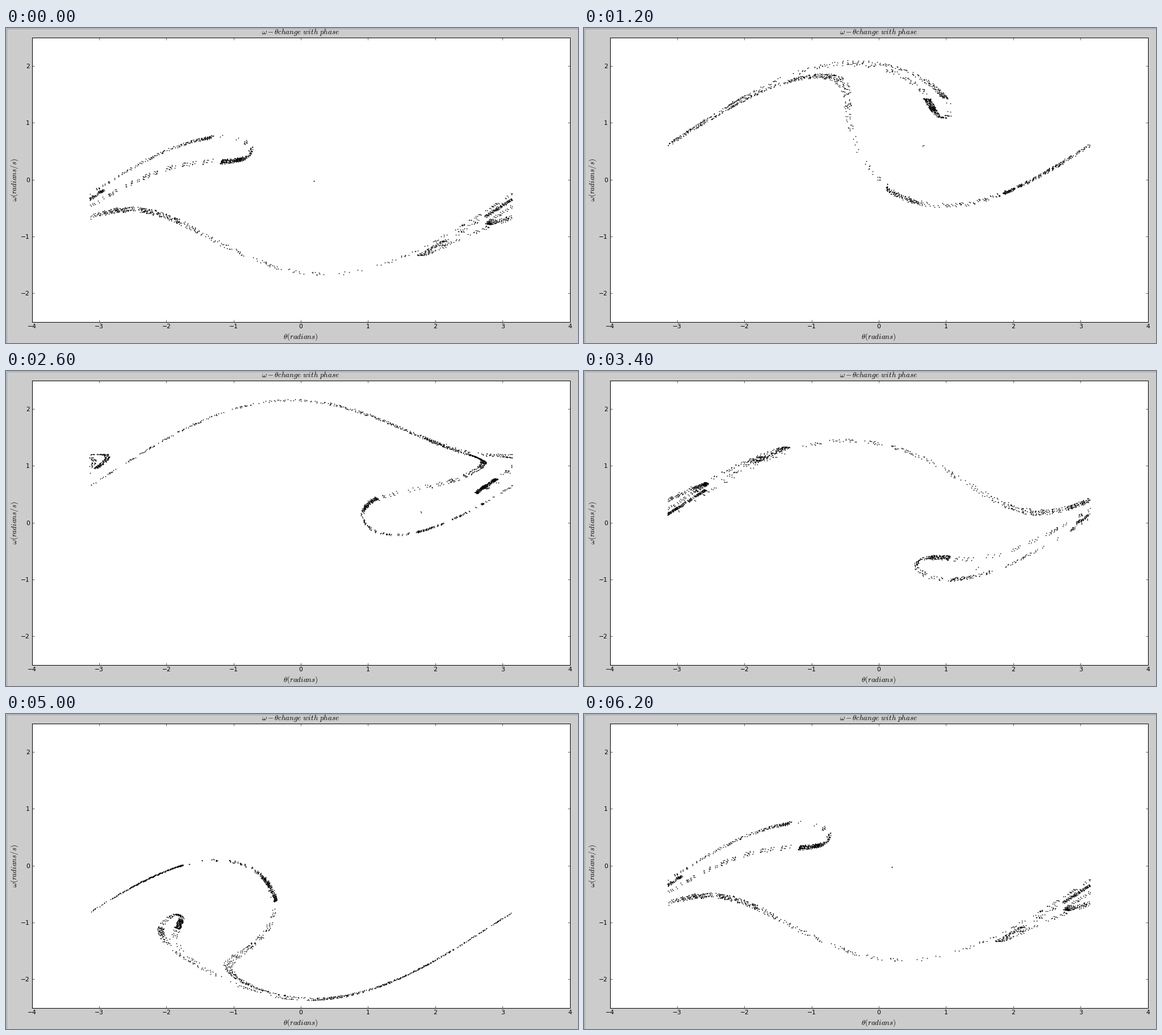
Recreate the animation shown at these times as a matplotlib script. Size 1007 px wide and 556 px high, loop 6.4 s.

```python
import math

import numpy as np
import matplotlib.pyplot as plt
from matplotlib.animation import FuncAnimation
from matplotlib.lines import Line2D

W, H, DPI = 1007, 556, 100
FRAMES, LOOP_MS = 32, 6400

# Driven damped pendulum, Euler-Cromer integration
DAMPING, FORCE, OMEGA_D = 0.5, 1.2, 2 / 3
DT = 0.04
PERIOD = 2 * math.pi / OMEGA_D
CYCLES = 800


def simulate(theta=0.2, omega=0.0):
    steps = int(CYCLES * PERIOD / DT)
    path = np.empty((steps, 3))
    t = 0.0
    for i in range(steps):
        path[i] = t, theta, omega
        omega -= (math.sin(theta) + DAMPING * omega
                  - FORCE * math.sin(OMEGA_D * t)) * DT
        theta += omega * DT
        if theta > math.pi:
            theta -= 2 * math.pi
        elif theta < -math.pi:
            theta += 2 * math.pi
        t += DT
    return path.T


TIME, THETA, SPEED = simulate()


def section(frame):
    """Points of the path taken at one phase of the drive."""
    phase = (frame % (FRAMES - 1) + 1) / FRAMES * PERIOD
    offset = (TIME - phase + PERIOD / 2) % PERIOD - PERIOD / 2
    hit = np.abs(offset) < DT
    return THETA[hit], SPEED[hit]


def px(n):
    return n * 72 / DPI


plt.rcParams.update({"font.family": "DejaVu Sans", "mathtext.fontset": "cm"})
fig = plt.figure(figsize=(W / DPI, H / DPI), dpi=DPI, facecolor="#cccccc")
ax = fig.add_axes([45.5 / W, 1 - 518.5 / H, 947 / W, 501.5 / H])
ax.set(xlim=(-4, 4), ylim=(-2.5, 2.5),
       xticks=range(-4, 5), yticks=range(-2, 3))
ax.tick_params(direction="in", top=True, right=True, length=px(3.6),
               width=px(0.6), pad=px(3.6), labelsize=px(10.8))
for spine in ax.spines.values():
    spine.set_linewidth(px(1))


def label(x, y, text, size, **kw):
    fig.text(x / W, 1 - y / H, text, size=px(size),
             ha="center", va="center", **kw)


label(518.5, 8, r"$\omega-\theta change\ with\ phase$", 13)
label(518.5, 545.5, r"$\theta(radians)$", 13)
label(15.5, 268, r"$\omega(radians/s)$", 13, rotation=90)

fig.add_artist(Line2D([0.5 / W, 0.5 / W, 1], [0, 1 - 0.5 / H, 1 - 0.5 / H],
                      color="#999999", lw=px(1)))

dots, = ax.plot([], [], "o", color="black", ms=px(1.7), mew=0)


def update(frame):
    dots.set_data(*section(frame))
    return dots,


anim = FuncAnimation(fig, update, frames=FRAMES, interval=LOOP_MS / FRAMES,
                     repeat=True, repeat_delay=0)
plt.show()
```
